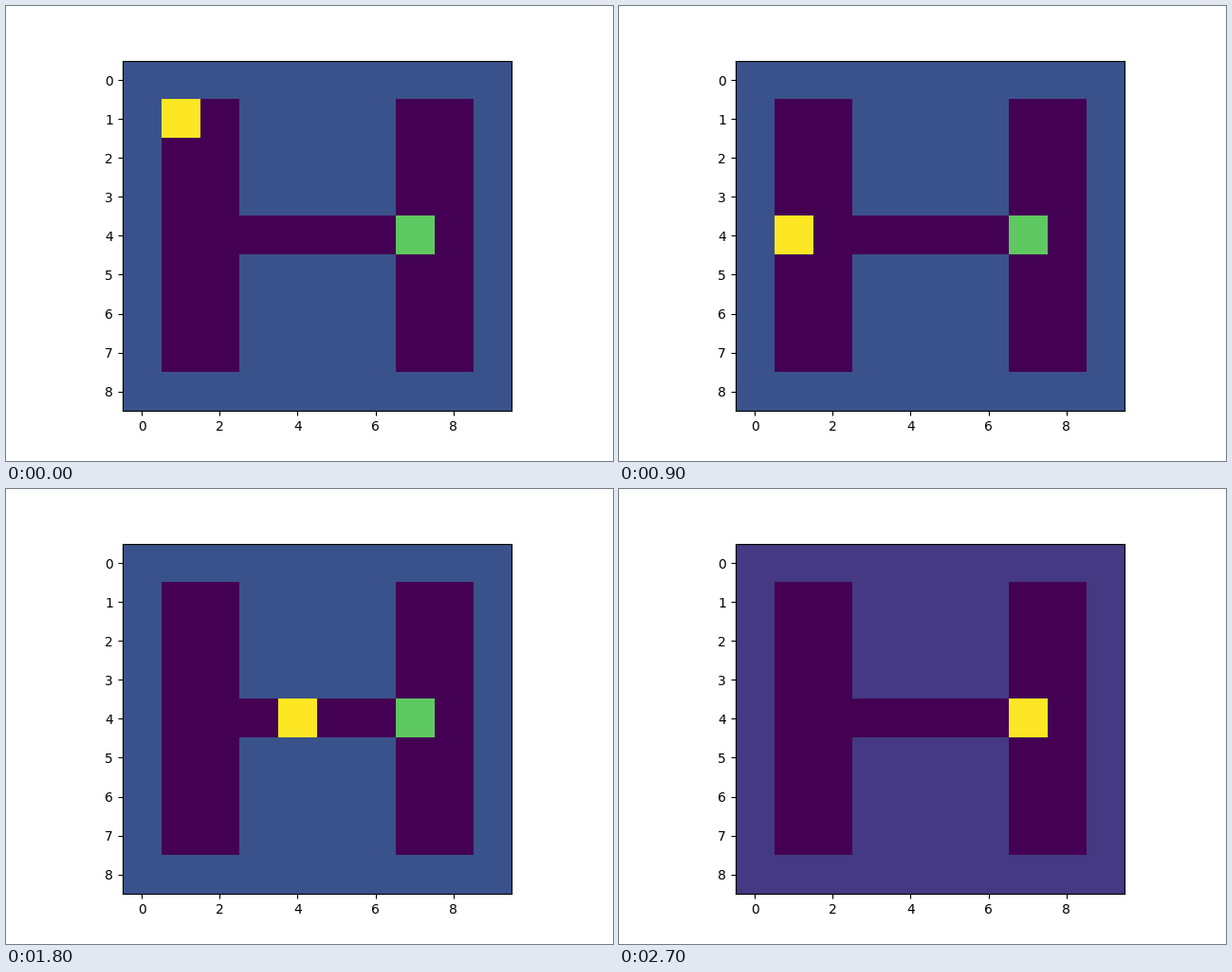
Animation of 640x480 px, one loop 3 s. Source, as a matplotlib script:

```python
import matplotlib.pyplot as plt
import numpy as np
from matplotlib.animation import FuncAnimation

ROWS, COLS = 9, 10
WALL, GOAL, AGENT, ARRIVED = 1, 3, 4, 6
GOAL_CELL = (4, 7)
PATH = [(row, 1) for row in range(1, 4)] + [(4, col) for col in range(1, 8)]


def build_maze():
    maze = np.full((ROWS, COLS), WALL)
    maze[1:8, 1:3] = 0
    maze[1:8, 7:9] = 0
    maze[4, 3:7] = 0
    maze[GOAL_CELL] = GOAL
    return maze


MAZE = build_maze()

fig, ax = plt.subplots(figsize=(6.4, 4.8), dpi=100)
image = ax.imshow(MAZE, cmap="viridis")


def update(step):
    grid = MAZE.copy()
    cell = PATH[step]
    grid[cell] = ARRIVED if cell == GOAL_CELL else AGENT
    image.set_data(grid)
    # Rescaling the colours makes the walls darken on arrival.
    image.set_clim(0, grid.max())
    return [image]


anim = FuncAnimation(fig, update, frames=len(PATH), interval=300,
                     repeat=True, repeat_delay=0)
plt.show()
```
